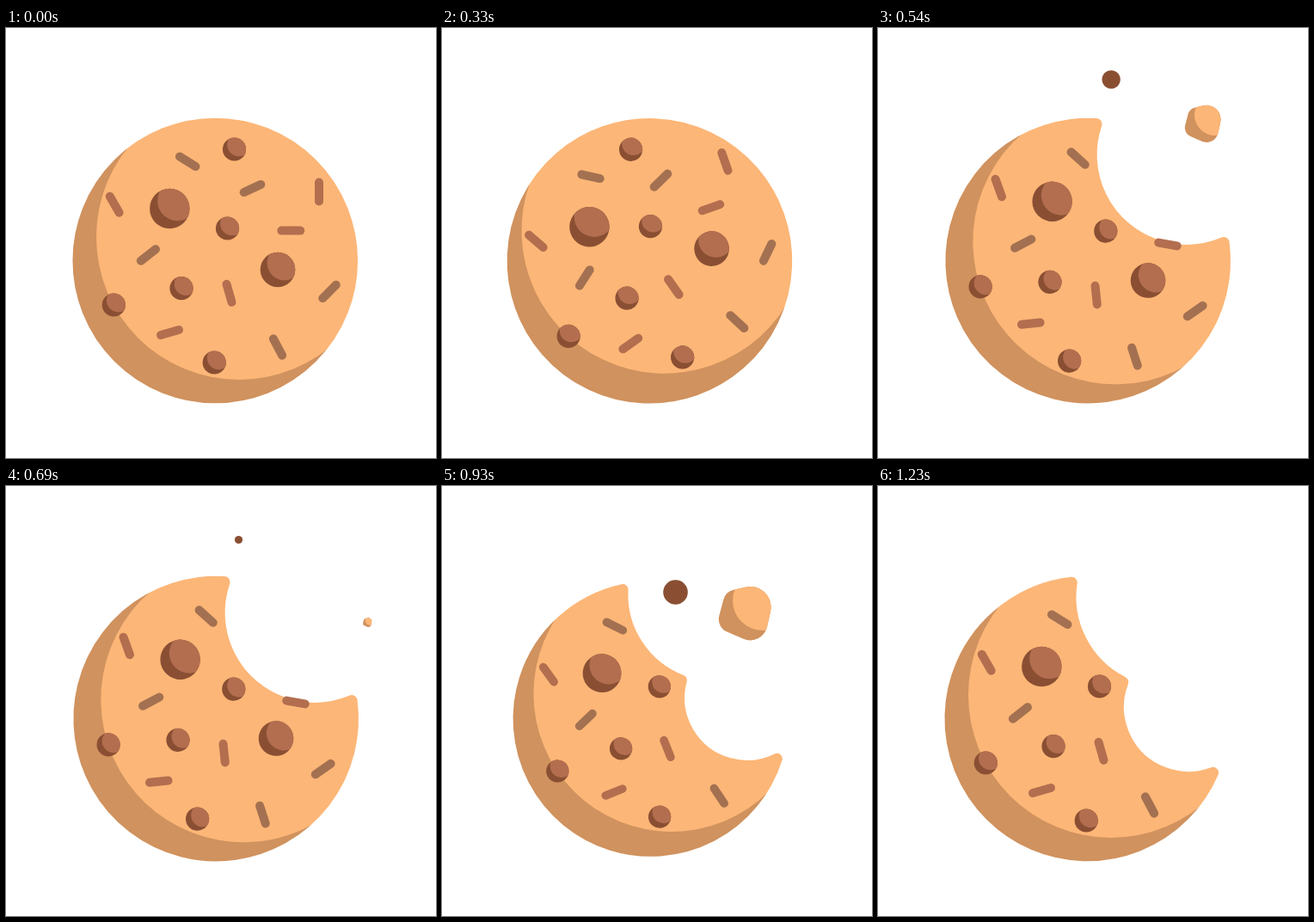
An HTML page with a canvas that plays this animation: 500 by 500 pixels, repeating every 1380 ms.

```html
<!DOCTYPE html>
<html lang="en">
<head>
<meta charset="utf-8">
<title>Cookie</title>
<style>
  html, body { margin: 0; width: 100%; height: 100%; overflow: hidden; background: #fff; }
  canvas { display: block; }
</style>
</head>
<body>
<canvas id="stage" width="500" height="500"></canvas>
<script>
const ctx = document.getElementById('stage').getContext('2d');
const LOOP = 1380, STEP = 30, TURN = -20, ROUND = 6.5;
const DOUGH = '#fcb677', SHADE = '#d0925e', CHIP = '#b36e4f', DARK = '#8a4f33', DULL = '#a37151';

// Radii leave room for the round-joined stroke that softens the corners.
const disc = { x: 243.25, y: 270.5, r: 165.8 - ROUND };
const holes = [
  { x: 335, y: 129, r: 104.5 + ROUND },
  { x: 361, y: 257, r: 75 + ROUND }
];
const pivot = { x: 243.25, y: 276 };

// x, y, radius, bite that removes it
const chips = [
  [265.5, 141, 13.6, 1], [190.3, 210, 23.2, 3], [257.5, 233, 13.6, 3], [316, 281, 20.3, 2],
  [204, 302.7, 13.6, 3], [125.3, 322, 13.6, 3], [242.2, 389, 13.6, 3]
];
// x, y, degrees, colour, bite that removes it
const sprinkles = [
  [211.2, 155.3, 32, DULL, 3], [286.5, 186.5, -25, DULL, 1], [126.2, 205.2, 60, CHIP, 3],
  [364, 190.5, 90, CHIP, 1], [331.3, 235.6, 0, CHIP, 2], [165.4, 264, -38, DULL, 3],
  [259.5, 308.3, 74, CHIP, 3], [376, 306.5, -45, DULL, 2], [190.5, 354, -16, CHIP, 3],
  [316, 371, 62, DULL, 3]
];
// Corners of the loose piece: x, y, rounding
const piece = [[329.7, 123, 16], [390.5, 108.5, 24], [372.6, 187.5, 20], [318.8, 164.1, 16]];

const rad = deg => deg * Math.PI / 180;
const clamp = v => Math.min(1, Math.max(0, v));
const mix = (a, b, p) => a + (b - a) * p;

function dot(x, y, r, color) {
  ctx.fillStyle = color;
  ctx.beginPath();
  ctx.arc(x, y, r, 0, 2 * Math.PI);
  ctx.fill();
}

// Crossing point of two circles, on the given side of the line from a to b
function meet(a, b, side) {
  const dx = b.x - a.x, dy = b.y - a.y, d = Math.hypot(dx, dy);
  const turn = Math.acos((d * d + a.r * a.r - b.r * b.r) / (2 * d * a.r));
  const angle = Math.atan2(dy, dx) + side * turn;
  return { x: a.x + a.r * Math.cos(angle), y: a.y + a.r * Math.sin(angle) };
}

function arcBetween(c, p, q, back) {
  const angle = o => Math.atan2(o.y - c.y, o.x - c.x);
  ctx.arc(c.x, c.y, c.r, angle(p), angle(q), back);
}

function drawBody(bites) {
  ctx.beginPath();
  if (bites) {
    const open = holes.slice(0, bites);
    const corners = [meet(disc, open[0], -1)];
    if (bites > 1) corners.push(meet(open[0], open[1], 1));
    corners.push(meet(disc, open[bites - 1], 1));
    arcBetween(disc, corners[bites], corners[0], false);
    open.forEach((hole, i) => arcBetween(hole, corners[i], corners[i + 1], true));
  } else {
    ctx.arc(disc.x, disc.y, disc.r, 0, 2 * Math.PI);
  }
  ctx.closePath();
  ctx.fillStyle = ctx.strokeStyle = SHADE;
  ctx.lineWidth = 2 * ROUND;
  ctx.lineJoin = 'round';
  ctx.fill();
  ctx.stroke();
  ctx.globalCompositeOperation = 'source-atop';
  dot(271, 243, 166, DOUGH);
  ctx.globalCompositeOperation = 'source-over';
}

function drawChip(x, y, r) {
  dot(x, y, r, DARK);
  ctx.save();
  ctx.clip();
  dot(x + r * 0.39, y - r * 0.39, r, CHIP);
  ctx.restore();
}

function drawSprinkle(x, y, deg, color) {
  const dx = 10.9 * Math.cos(rad(deg)), dy = 10.9 * Math.sin(rad(deg));
  ctx.strokeStyle = color;
  ctx.lineWidth = 10;
  ctx.lineCap = 'round';
  ctx.beginPath();
  ctx.moveTo(x - dx, y - dy);
  ctx.lineTo(x + dx, y + dy);
  ctx.stroke();
}

function drawCookie(bites, deg, scale) {
  ctx.save();
  ctx.translate(pivot.x, pivot.y);
  ctx.rotate(rad(deg));
  ctx.scale(scale, scale);
  ctx.translate(-pivot.x, -pivot.y);
  drawBody(bites);
  chips.forEach(c => c[3] > bites && drawChip(...c));
  sprinkles.forEach(s => s[4] > bites && drawSprinkle(...s));
  ctx.restore();
}

// Thrown pieces shrink while gravity bends their paths; u runs from 0 to 1.
function drawCrumbs(u) {
  const fall = 174 * u * u;
  dot(271.5 - u, 123.5 - 235 * u + fall, 14.3 - 9.7 * u, DARK);

  const scale = 1 - 0.83 * u;
  ctx.save();
  ctx.translate(354 + 66.5 * u, 147 - 162.5 * u + fall);
  ctx.scale(scale, scale);
  ctx.translate(-354, -147);
  ctx.beginPath();
  ctx.moveTo(360, 115.9);
  for (let i = 1; i <= 4; i++) {
    const [x, y, r] = piece[i % 4], [nx, ny] = piece[(i + 1) % 4];
    ctx.arcTo(x, y, nx, ny, r);
  }
  ctx.closePath();
  ctx.fillStyle = SHADE;
  ctx.fill();
  ctx.clip();
  dot(373, 133, 35, DOUGH);
  ctx.restore();
}

function draw(t) {
  const second = t >= 690;
  const [from, to] = second ? [10, 0] : [0, 10];
  const local = t - (second ? 690 : 180);
  const bitten = local > 200;
  const windUp = 0.5 - 0.5 * Math.cos(Math.PI * clamp(local / 170));
  const rest = (1 - clamp((local - 200) / 117)) ** 3;
  const deg = bitten ? mix(to, TURN, rest) : mix(from, TURN, windUp);
  const squash = bitten ? rest : clamp((local - 170) / 30);

  ctx.clearRect(0, 0, 500, 500);
  drawCookie(second + bitten, deg, 1 - 0.12 * squash);
  for (const start of [450, 960]) {
    if (t >= start - 60 && t < start + 270) drawCrumbs(clamp((t - start) / 240));
  }
}

const begin = performance.now();
function tick() {
  const t = (performance.now() - begin) % LOOP;
  draw(Math.floor(t / STEP) * STEP);
  requestAnimationFrame(tick);
}
tick();
</script>
</body>
</html>
```
